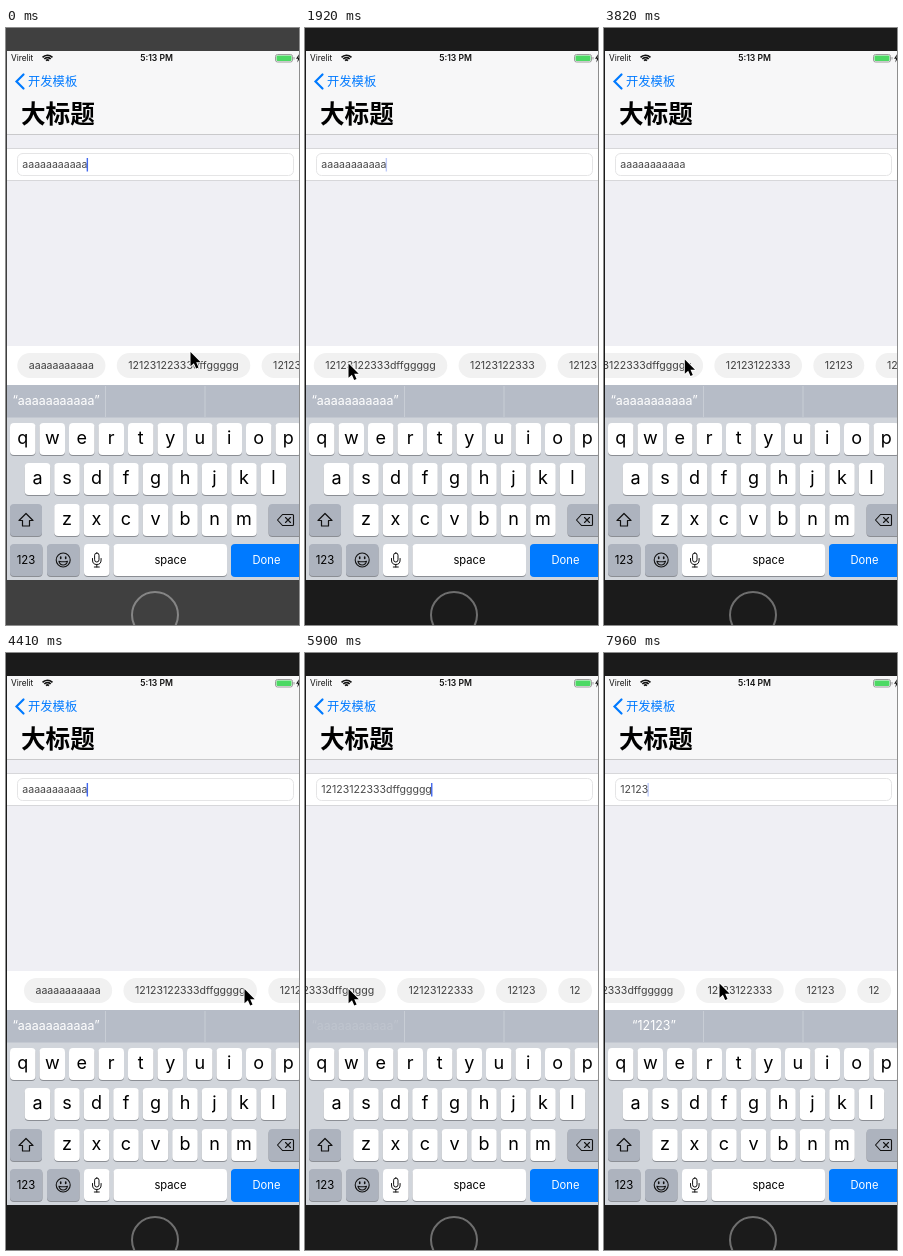
An HTML page with a canvas for the animation above (8 s loop, 293 by 597 pixels).

```html
<!DOCTYPE html>
<html lang="zh">
<head>
<meta charset="utf-8">
<title>Input suggestions</title>
<style>
html, body { margin: 0; width: 100%; height: 100%; overflow: hidden; background: #1b1b1b; }
canvas { display: block; width: 293px; height: 597px; }
</style>
</head>
<body>
<canvas id="stage"></canvas>
<script>
const W = 293, H = 597, LOOP = 8000, STEP = 147.3, HOLD = 280;
const canvas = document.getElementById('stage');
const ctx = canvas.getContext('2d');
const dpr = window.devicePixelRatio || 1;
canvas.width = Math.round(W * dpr);
canvas.height = Math.round(H * dpr);

const LATIN = 'Inter, "Open Sans", sans-serif';
const CJK = '"Noto Sans CJK SC", "Noto Sans CJK", sans-serif';
const BLUE = '#007aff', INK = '#111', GRAY = '#adb3be';
const SMALL = 10.55;
const labels = ['aaaaaaaaaaa', '12123122333dffggggg', '12123122333', '12123', '12'];

// All timing is in steps: the screen refreshes once per STEP after the first HOLD.
const path = [
  [0, 184, 324], [9, 140, 336], [10, 145, 336], [12, 43, 335.5], [17, 157, 331],
  [20, 80, 330], [24, 62, 331], [29, 238, 336], [32, 45, 336], [40, 43, 336],
  [47, 226, 337], [49, 226, 337], [53, 115, 330.5]
];
const drags = [[10, 12], [17, 20], [24, 32]];
const taps = [[0, 0], [38, 1], [45, 2], [48, 3]];
const blinks = [0, 4, 10, 28, 34, 38, 45, 51];
const CLOCK_STEP = 50, FOCUS_STEP = 10;

const stepAt = t => t < HOLD ? 0 : 1 + Math.floor((t - HOLD) / STEP);
const valueAt = s => labels[taps.findLast(tap => tap[0] <= Math.max(s, 0))[1]];

function caretAt(s) {
  const age = s - blinks.findLast(b => b <= s);
  return age < 2 ? 1 : age === 2 ? .35 : 0;
}

function pointerAt(s) {
  const i = path.findIndex(p => p[0] > s);
  if (i < 0) return path[path.length - 1].slice(1);
  const [a, x0, y0] = path[i - 1], [b, x1, y1] = path[i];
  const p = (s - a) / (b - a), e = p * p * (3 - 2 * p);
  return [x0 + (x1 - x0) * e, y0 + (y1 - y0) * e];
}

// Past either end the list follows the finger with growing resistance.
const resist = d => .55 * d / (1 + .55 * d / W);
function rubber(x, max) {
  if (x < 0) return -resist(-x);
  return x > max ? max + resist(x - max) : x;
}

function scrollAt(s, max) {
  const i = drags.findLastIndex(d => d[0] <= s);
  if (i < 0) return 0;
  const [from, to] = drags[i];
  const moved = pointerAt(from)[0] - pointerAt(Math.min(s, to))[0];
  const dragged = rubber((i ? max : 0) + moved, max);
  return s <= to ? dragged : max + (dragged - max) * Math.exp(to - s);
}

function rect(x, y, w, h, fill) {
  ctx.fillStyle = fill;
  ctx.fillRect(x, y, w, h);
}

function round(x, y, w, h, r, fill, stroke) {
  ctx.beginPath();
  ctx.roundRect(x, y, w, h, r);
  if (fill) { ctx.fillStyle = fill; ctx.fill(); }
  if (stroke) { ctx.strokeStyle = stroke; ctx.lineWidth = 1; ctx.stroke(); }
}

function arc(x, y, r, from, to, width, color) {
  ctx.beginPath();
  ctx.arc(x, y, r, from, to);
  ctx.lineWidth = width;
  ctx.strokeStyle = color;
  ctx.stroke();
}

function line(d, x, y, width, color = INK) {
  ctx.save();
  ctx.translate(x, y);
  ctx.lineWidth = width;
  ctx.strokeStyle = color;
  ctx.stroke(new Path2D(d));
  ctx.restore();
}

function text(str, x, y, size, fill, align = 'left', weight = 400, family = LATIN) {
  ctx.font = `${weight} ${size}px ${family}`;
  ctx.textAlign = align;
  ctx.fillStyle = fill;
  ctx.fillText(str, x, y);
}

function textWidth(str, size) {
  ctx.font = `400 ${size}px ${LATIN}`;
  return ctx.measureText(str).width;
}

function drawStatus(clock) {
  text('Virelit', 5, 33.3, 8.3, INK);
  text(clock, 150.5, 33.4, 8.6, INK, 'center', 600);
  ctx.lineCap = 'butt';
  for (let r = 2; r < 7; r += 2.4) arc(41.5, 34, r, -Math.PI * .76, -Math.PI * .24, 1.6, INK);
  round(269.5, 26.5, 17, 7.5, 2, null, '#9b9b9b');
  round(270.5, 27.5, 15, 5.5, 1, '#4cd964');
  rect(287.5, 29, 1, 2.5, '#9b9b9b');
  ctx.fillStyle = INK;
  ctx.fill(new Path2D('M293 26.2L290 30.8H292L291.3 34.5L294 30H292.5Z'));
}

function drawPage(value, caretAlpha) {
  rect(0, 23, W, 83, '#f7f7f8');
  rect(0, 106, W, 1, '#c9c9cb');
  rect(0, 107, W, 211, '#efeff4');
  rect(0, 120, W, 33, '#d7d7da');
  rect(0, 121, W, 31, '#fff');
  ctx.lineCap = 'round';
  ctx.lineJoin = 'miter';
  line('M7 0L0 7L7 14', 10.5, 46.5, 2.2, BLUE);
  text('开发模板', 22, 57.6, 12.3, BLUE, 'left', 400, CJK);
  text('大标题', 15, 95.3, 24.6, '#000', 'left', 700, CJK);
  round(11.5, 125.5, 276, 22, 5, '#fff', '#e5e5e6');
  text(value, 16.3, 140.4, SMALL, '#484848');
  ctx.globalAlpha = caretAlpha;
  rect(15.5 + textWidth(value, SMALL), 130, 1.4, 13.5, '#4268ee');
  ctx.globalAlpha = 1;
}

function drawPills(s) {
  const gap = 11.3, pad = 11.5;
  const widths = labels.map(label => textWidth(label, SMALL) + 2 * pad);
  const end = widths.reduce((sum, w) => sum + w + gap, 0);
  let x = gap - scrollAt(s, end - 287);
  rect(0, 318, W, 39, '#fff');
  labels.forEach((label, i) => {
    round(x, 325, widths[i], 25, 12.5, '#f1f1f1');
    text(label, x + pad, 341.4, SMALL, '#404040');
    x += widths[i] + gap;
  });
}

// The guess trails the field, fading out before it changes; long words get none.
function drawGuess(s) {
  const word = valueAt(s - 2);
  rect(0, 357, W, 33, '#b6bcc7');
  for (const x of [99, 198.5]) rect(x, 358, 1, 31, '#c8cdd5');
  if (word.length > 11) return;
  ctx.globalAlpha = word === valueAt(s - 1) ? 1 : .13;
  text('“' + word + '”', 50, 376.6, 12.4, '#fff', 'center');
  ctx.globalAlpha = 1;
}

function key(x, y, w, fill = '#fff') {
  round(x, y + 1, w, 32, 4, fill === BLUE ? BLUE : '#8b8e94');
  round(x, y, w, 32, 4, fill);
}

function drawKeyboard() {
  const pitch = 29.5, rowY = i => Math.round(395 + 40.4 * i);
  rect(0, 389.5, W, 162.5, '#d1d5db');
  ['qwertyuiop', 'asdfghjkl', 'zxcvbnm'].forEach((row, r) => {
    const left = 4 + pitch * (10 - row.length) / 2;
    [...row].forEach((c, i) => {
      const x = left + i * pitch;
      key(x, rowY(r), 25.5);
      text(c, x + 12.75, rowY(r) + 21.3, 18, '#000', 'center');
    });
  });
  key(4, rowY(2), 32, GRAY);
  key(262.5, rowY(2), 36, GRAY);
  const y = rowY(3);
  key(4, y, 32.5, GRAY);
  key(41, y, 32.5, GRAY);
  key(78, y, 25.5);
  key(107.5, y, 113.5);
  key(225, y, 71, BLUE);
  text('123', 20, y + 20.4, 11.4, '#000', 'center');
  text('space', 164.5, y + 19.7, 11.2, '#000', 'center');
  text('Done', 260.5, y + 19.7, 11.2, '#fff', 'center');

  ctx.lineCap = 'round';
  ctx.lineJoin = 'round';
  line('M0 -6.5L7 .5H3.5V6H-3.5V.5H-7Z', 20, 492, 1.2);
  line('M-8 0L-3 -5.5H7Q8 -5.5 8 -4.5V4.5Q8 5.5 7 5.5H-3ZM0 -2.5L5 2.5M5 -2.5L0 2.5', 279.5, 492, 1.1);
  arc(57.2, 532, 7, 0, Math.PI * 2, 1.1, INK);
  line('M-4.3 1.2Q0 2.4 4.3 1.2Q3.5 5 0 5Q-3.5 5 -4.3 1.2', 57.2, 532, 1.1);
  line('M-2.5 -3V-1.6M2.5 -3V-1.6', 57.2, 532, 1.6);
  round(88.6, 525, 4.4, 9, 2.2, null, INK);
  line('M-4.3 -1V.5Q-4.3 5 0 5Q4.3 5 4.3 .5V-1M0 5V7.5M-2.5 7.5H2.5', 90.8, 531.5, 1);
}

function drawPointer(x, y) {
  const arrow = new Path2D('M0 0V14.2L3.4 11.2L5.7 16.6L8 15.6L5.7 10.3H10.2Z');
  ctx.save();
  ctx.translate(x + .5, y);
  ctx.lineJoin = 'round';
  ctx.lineWidth = 1.8;
  ctx.strokeStyle = '#fff';
  ctx.stroke(arrow);
  ctx.fillStyle = '#000';
  ctx.fill(arrow);
  ctx.restore();
}

function draw(t) {
  const s = stepAt(t);
  const focused = s >= FOCUS_STEP;
  const shell = focused ? '#1b1b1b' : '#404040';
  ctx.setTransform(dpr, 0, 0, dpr, 0, 0);
  rect(0, 0, W, H, shell);
  drawPage(valueAt(s), caretAt(s));
  drawStatus(s < CLOCK_STEP ? '5:13 PM' : '5:14 PM');
  drawPills(s);
  drawGuess(s);
  drawKeyboard();
  rect(0, 23, 1, 529, shell);
  rect(0, 552, W, 45, shell);
  arc(149, 587, 23, 0, Math.PI * 2, 2, focused ? '#6e6e6e' : '#858585');
  drawPointer(...pointerAt(s));
}

function tick() {
  draw(performance.now() % LOOP);
  requestAnimationFrame(tick);
}
tick();
</script>
</body>
</html>
```
